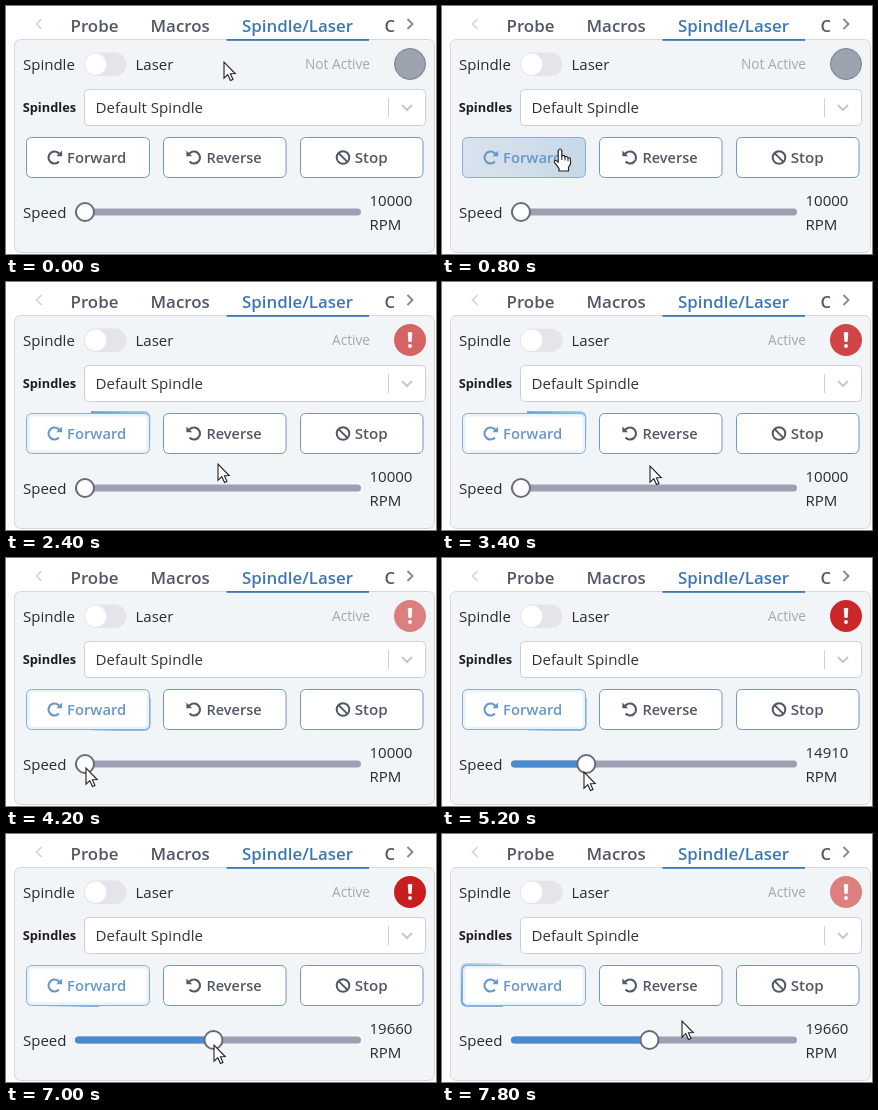
Recreate the animation shown at these times as an HTML page with a canvas. Size 430 by 248 pixels, loop 8000 ms.

```html
<!DOCTYPE html>
<html lang="en">
<head>
<meta charset="utf-8">
<title>Spindle control</title>
<style>
html, body { margin: 0; width: 100%; height: 100%; overflow: hidden; background: #fff; }
canvas { display: block; width: 430px; height: 248px; }
</style>
</head>
<body>
<canvas id="stage" width="430" height="248"></canvas>
<script>
const ctx = document.getElementById('stage').getContext('2d');
const LOOP = 8000, STEP = 200;
const INK = '#282b30', GREY = '#515865', BLUE = '#3d78b3', PALE_BLUE = '#6797cb';
const CLICK_AT = 1200;

// [time, x, y] of the pointer tip
const POINTER = [
  [0, 218, 56], [200, 215, 62], [800, 118, 143], [1200, 110, 151], [1600, 110, 151],
  [2000, 165, 172], [2400, 212, 182], [3400, 208, 184], [3800, 84, 209],
  [4200, 80, 210], [4400, 80, 211], [5200, 142, 214], [6400, 200.5, 211.5],
  [6800, 208, 211], [7200, 208, 211], [7600, 236, 190], [7800, 240, 187]
];
// [time, rpm]
const RPM = [[0, 10000], [4400, 10000], [5200, 14910], [6400, 19100], [6800, 19660]];

const smooth = x => x * x * (3 - 2 * x);

function sample(keys, t, i = 1) {
  for (let k = 1; k < keys.length; k++) {
    const a = keys[k - 1], b = keys[k];
    if (t < b[0]) return a[i] + (b[i] - a[i]) * (t - a[0]) / (b[0] - a[0]);
  }
  return keys[keys.length - 1][i];
}

function text(str, x, y, size, color, weight = 400) {
  ctx.font = `${weight} ${size}px "Open Sans", "Noto Sans", sans-serif`;
  ctx.fillStyle = color;
  ctx.fillText(str, x, y);
}

function box(x, y, w, h, r, fill, stroke, width = 1) {
  ctx.beginPath();
  ctx.roundRect(x, y, w, h, r);
  paint(fill, stroke, width);
}

function disc(x, y, r, fill, stroke, width = 1) {
  ctx.beginPath();
  ctx.arc(x, y, r, 0, Math.PI * 2);
  paint(fill, stroke, width);
}

function shape(points, fill, stroke, width = 1) {
  ctx.beginPath();
  points.forEach(([x, y]) => ctx.lineTo(x, y));
  ctx.closePath();
  paint(fill, stroke, width);
}

function line(points, color, width) {
  ctx.beginPath();
  points.forEach(([x, y]) => ctx.lineTo(x, y));
  paint(null, color, width);
}

function paint(fill, stroke, width) {
  if (fill) { ctx.fillStyle = fill; ctx.fill(); }
  if (stroke) { ctx.strokeStyle = stroke; ctx.lineWidth = width; ctx.stroke(); }
}

function drawTabs() {
  line([[35.5, 13], [30.5, 18], [35.5, 23]], '#d3d5d9', 1.7);
  line([[401.5, 13], [406.5, 18], [401.5, 23]], '#858a93', 1.9);
  text('Probe', 64.5, 25.5, 16.9, GREY, 600);
  text('Macros', 144.5, 25.5, 16.9, GREY, 600);
  text('Spindle/Laser', 236, 25.5, 16.9, BLUE, 600);
  ctx.save();
  ctx.beginPath();
  ctx.rect(376, 4, 12, 28);
  ctx.clip();
  text('C', 378.5, 25.5, 16.9, GREY, 600);
  ctx.restore();
}

function drawStatus(t, active) {
  if (!active) {
    text('Not Active', 299, 63, 13.7, '#a3a7af');
    disc(404, 58, 15.5, '#9ca3af', '#7b828f');
    return;
  }
  text('Active', 326, 63, 13.7, '#a3a7af');
  const phase = t % 2000 / 1000;
  ctx.globalAlpha = 0.5 + 0.5 * smooth(phase < 1 ? phase : 2 - phase);
  disc(404, 58, 16, '#c81e1e');
  ctx.globalAlpha = 1;
  shape([[402.2, 50.5], [405.8, 50.5], [405.2, 59.5], [402.8, 59.5]], '#fff', '#fff', 0.8);
  disc(404, 64, 1.9, '#fff');
}

function drawTurnIcon(x, y, color, dir) {
  ctx.save();
  ctx.translate(x, y);
  ctx.scale(dir, 1);
  ctx.beginPath();
  ctx.arc(0, 0, 6, 0.75, 5.6);
  paint(null, color, 2.1);
  shape([[7.6, -7], [7.6, -1.3], [1.9, -1.3]], color);
  ctx.restore();
}

function drawBanIcon(x, y, color) {
  disc(x, y, 6.3, null, color, 2);
  line([[x - 4.4, y - 4.4], [x + 4.4, y + 4.4]], color, 2);
}

// A fading quarter wedge turning behind the button shows only at its rim
function drawBeam(t) {
  const start = (8 - 72 * (t - 1400) / STEP - 90) * Math.PI / 180;
  const fade = ctx.createConicGradient(start, 82, 151);
  fade.addColorStop(0, '#5b98d4');
  fade.addColorStop(0.12, '#78abdd');
  fade.addColorStop(0.25, '#d3e3f2');
  ctx.save();
  ctx.beginPath();
  ctx.roundRect(18.7, 129.3, 125.8, 43.4, 6);
  ctx.clip();
  ctx.beginPath();
  ctx.moveTo(82, 151);
  ctx.arc(82, 151, 90, start, start + Math.PI / 2);
  paint(fade);
  ctx.restore();
}

function hoverFill() {
  const fill = ctx.createLinearGradient(20, 0, 143, 0);
  fill.addColorStop(0, '#dae3ec');
  fill.addColorStop(1, '#c8d8e8');
  return fill;
}

function drawButtons(t, active, hover) {
  const lit = active || hover;
  const color = lit ? PALE_BLUE : GREY;
  if (active) drawBeam(t);
  box(20.5, 131.5, 123, 40, 5, hover ? hoverFill() : '#fff');
  if (active && !hover) box(22, 133, 120, 37, 4, null, '#eaf2fa', 3);
  box(20.5, 131.5, 123, 40, 5, null, lit ? '#86aedb' : '#6f96c2');
  box(157.5, 131.5, 122.5, 40, 5, '#fff', '#6f96c2');
  box(294.5, 131.5, 122.5, 40, 5, '#fff', '#6f96c2');

  drawTurnIcon(48.5, 151.5, color, 1);
  text('Forward', 61, 157, 14.8, color, 600);
  drawTurnIcon(188, 151.5, GREY, -1);
  text('Reverse', 200.5, 157, 14.5, GREY, 600);
  drawBanIcon(337, 151.5, GREY);
  text('Stop', 348.7, 157, 15.2, GREY, 600);
}

function drawSlider(t) {
  const rpm = Math.round(sample(RPM, t) / 10) * 10;
  const x = 79 + (rpm - 10000) / 20000 * 266;
  text('Speed', 17, 211.5, 15, INK);
  box(69, 202.5, 286, 7, 3.5, '#9da0b3');
  box(69, 202.5, x - 69, 7, 3.5, '#4a8bd0');
  disc(x, 206, 9, '#fff', '#676d7a', 2);
  text(String(rpm), 363.5, 199.5, 15, INK);
  text('RPM', 363.5, 223.5, 15, INK);
}

function drawArrow() {
  shape([[0, 0], [0, 16.2], [3.8, 12.7], [6.5, 18.6], [9, 17.5], [6.4, 11.7], [11.2, 11.6]],
    '#fff', '#222', 1.1);
}

function drawHand() {
  ctx.beginPath();
  ctx.moveTo(-1.8, 1.5);
  ctx.quadraticCurveTo(0, -1.5, 1.8, 1.5);
  ctx.lineTo(1.8, 7);
  ctx.quadraticCurveTo(4, 5.3, 5, 8);
  ctx.quadraticCurveTo(7, 6.5, 8, 9);
  ctx.quadraticCurveTo(10.5, 8, 10.5, 11);
  ctx.lineTo(10.5, 15);
  ctx.lineTo(8.5, 18.5);
  ctx.lineTo(8.5, 22);
  ctx.lineTo(-1, 22);
  ctx.lineTo(-1, 19.5);
  ctx.lineTo(-5.7, 13);
  ctx.quadraticCurveTo(-5.5, 9.8, -1.8, 13);
  ctx.closePath();
  paint('#fff', '#222', 1.2);
  line([[1.8, 7], [1.8, 11]], '#222', 1);
  line([[5, 8], [5, 11.5]], '#222', 1);
  line([[8, 9], [8, 12]], '#222', 1);
}

function draw(t) {
  const active = t >= CLICK_AT;
  const px = sample(POINTER, t), py = sample(POINTER, t, 2);
  const hover = px > 20 && px < 143 && py > 131 && py < 171;

  ctx.fillStyle = '#fff';
  ctx.fillRect(0, 0, 430, 248);
  drawTabs();
  box(8.5, 33.5, 420, 213, 6, '#f2f5f7', '#d4d8de');
  ctx.fillStyle = BLUE;
  ctx.fillRect(220.5, 33, 142.5, 1.8);

  text('Spindle', 17, 64, 15, INK);
  box(78, 46.5, 42.5, 23.5, 11.75, '#e5e4ea');
  disc(89.6, 58.2, 10.7, '#fff');
  text('Laser', 129.5, 64, 15, INK);
  drawStatus(t, active);

  text('Spindles', 16.7, 105.5, 12.8, '#1c1e22', 700);
  box(78.5, 83.5, 341, 36, 4, '#fff', '#cccfd4');
  text('Default Spindle', 89.5, 107, 15.1, '#303338');
  line([[382.5, 92], [382.5, 111]], '#cfd1d5', 1);
  line([[396, 99], [401, 104], [406, 99]], '#c6c8cc', 2);

  drawButtons(t, active, hover);
  drawSlider(t);

  ctx.save();
  ctx.translate(px, py);
  if (hover) drawHand(); else drawArrow();
  ctx.restore();
}

const began = performance.now();
function tick() {
  const t = (performance.now() - began) % LOOP;
  draw(Math.floor(t / STEP) * STEP);
  requestAnimationFrame(tick);
}
tick();
</script>
</body>
</html>
```
